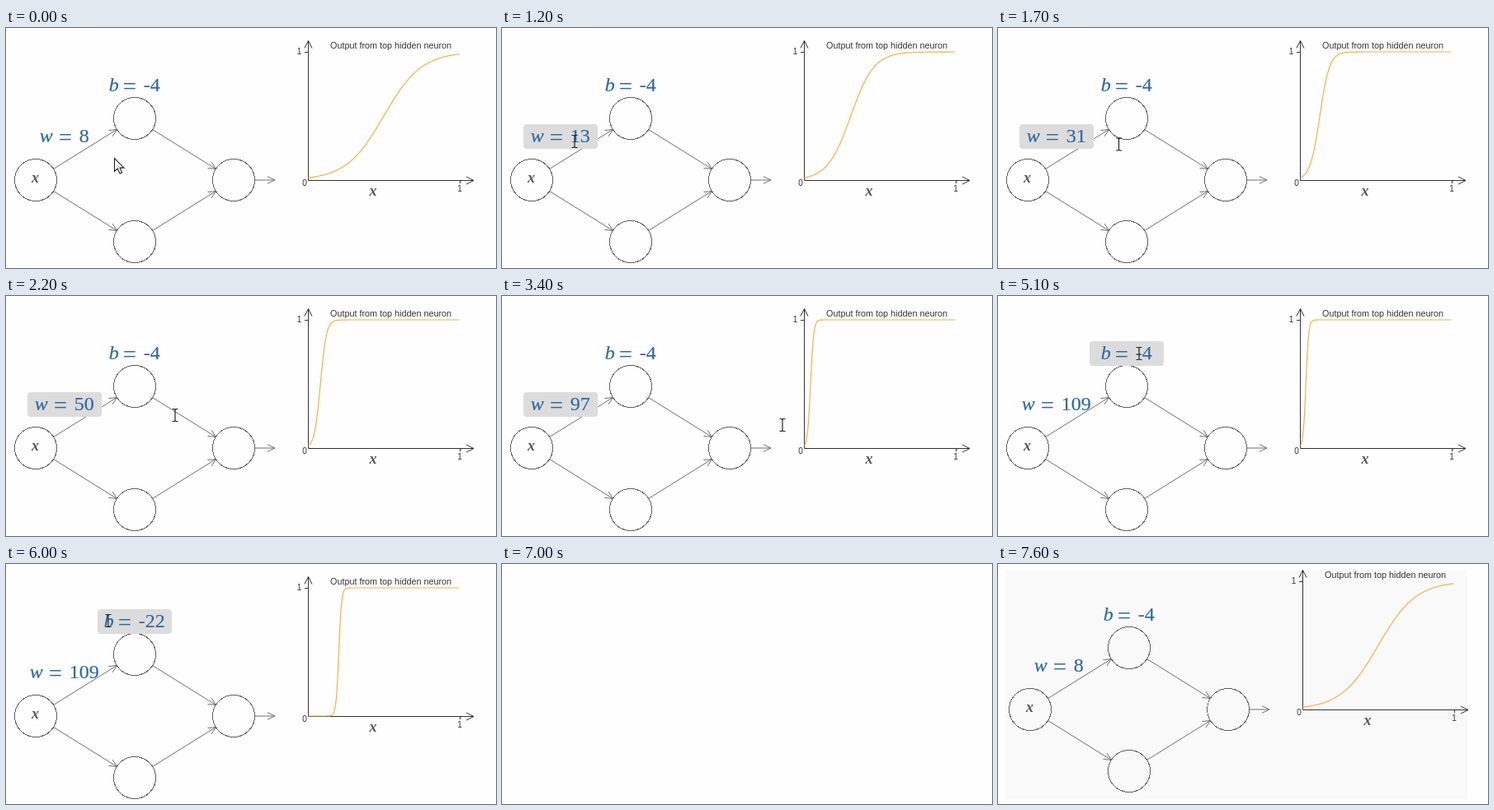
Recreate the animation shown at these times as an HTML page. Size 594 px wide and 292 px high, loop 8 s.

```html
<!DOCTYPE html>
<html lang="en">
<head>
<meta charset="utf-8">
<title>Hidden neuron output</title>
<style>
  html, body { margin: 0; width: 100%; height: 100%; overflow: hidden; background: #fefefe; }
  svg { display: block; width: 594px; height: 292px; }
  path { fill: none; }
  .line { stroke: #6e6e6e; }
  .node { fill: none; stroke: #606060; shape-rendering: crispEdges; }
  .axis { stroke: #333; }
  .curve { stroke: #f3b14c; stroke-width: 1.2; stroke-linejoin: round; }
  .small { font: 10.8px "Liberation Sans", Arial, sans-serif; fill: #333; }
  .tick { font-size: 10px; text-anchor: middle; }
  .var { font: italic bold 18px "Liberation Serif", Times, serif; fill: #555; text-anchor: middle; }
  .label { font: 24px "Liberation Serif", Times, serif; fill: #2f6a9e; stroke: #2f6a9e; stroke-width: .2; }
  .label .name { font-style: italic; }
  .label .eq { font-size: 29px; stroke: none; }
</style>
</head>
<body>
<svg viewBox="0 0 594 292" xmlns="http://www.w3.org/2000/svg">
  <rect id="panel" x="9" y="7" width="560" height="279.5" fill="#f9f9f9"/>
  <g id="scene">
    <g id="net"></g>
    <text class="var" x="35.5" y="188">x</text>
    <path class="axis" d="M366.5 185.5V15.5M362 24.5L366.5 15.5L371 24.5M366.5 185.5H567M558 181L567 185.5L558 190M362 29.5H366.5M550.5 185.5V189"/>
    <text class="small" x="393" y="25">Output from top hidden neuron</text>
    <text class="small tick" x="355.5" y="32">1</text>
    <text class="small tick" x="362" y="192">0</text>
    <text class="small tick" x="550" y="199">1</text>
    <text class="var" x="445" y="204">x</text>
    <path id="curve" class="curve"/>
    <rect id="hoverW" x="26" y="117" width="90" height="30" rx="4"/>
    <rect id="hoverB" x="111" y="55" width="90" height="30" rx="4"/>
    <g id="weight" class="label"></g>
    <g id="bias" class="label"></g>
  </g>
  <path id="arrow" d="M.5 .5V16.5L4.2 13L7 19L9.6 17.9L6.9 12.1H12Z" style="fill:#fff" stroke="#222" stroke-width="1.1"/>
  <path id="beam" d="M-3.5 -7.5H-1L0 -6.5L1 -7.5H3.5M0 -6.5V6.5M-3.5 7.5H-1L0 6.5L1 7.5H3.5" stroke="#222" stroke-width="1.2"/>
</svg>
<script>
const LOOP = 8000, STEP = 100, RADIUS = 25.5;
const GRAB_W = 70, GRAB_B = 171;
const $ = id => document.getElementById(id);

// Pointer stops: ms, x, y
const stops = [
  [0, 131, 158], [400, GRAB_W, 134], [700, GRAB_W, 134], [1200, 88, 138],
  [2200, 205, 145], [3400, 340, 157], [3700, 373, 158], [4200, 298, 122],
  [4800, GRAB_B, 70], [5300, GRAB_B, 70], [6000, 124, 69], [6400, 94, 69]
];

function pointerAt(t) {
  const i = stops.findIndex(s => s[0] > t);
  if (i < 0) return stops[stops.length - 1].slice(1);
  const [t0, x0, y0] = stops[i - 1], [t1, x1, y1] = stops[i];
  const k = (t - t0) / (t1 - t0);
  return [x0 + (x1 - x0) * k, y0 + (y1 - y0) * k];
}

// Both values follow the horizontal drag distance
const dragWeight = x => Math.round(8 + .2073 * Math.max(0, x - GRAB_W) ** 1.083);
const dragBias = x => Math.round(-4 - .385 * (GRAB_B - x));

function values(t) {
  if (t >= 7600) return [8, -4];
  const wx = t < 700 ? GRAB_W : pointerAt(Math.min(t, 3700))[0];
  const bx = pointerAt(Math.max(t, 5300))[0];
  return [dragWeight(wx), dragBias(bx)];
}

function link(a, b, gap = RADIUS) {
  const dir = Math.atan2(b.y - a.y, b.x - a.x);
  const point = (p, r, angle) => `${p.x + r * Math.cos(angle)} ${p.y + r * Math.sin(angle)}`;
  const tip = { x: b.x - gap * Math.cos(dir), y: b.y - gap * Math.sin(dir) };
  const wing = s => point(tip, -10, dir + s);
  return `<path class="line" d="M${point(a, RADIUS, dir)}L${tip.x} ${tip.y}M${wing(.45)}L${tip.x} ${tip.y}L${wing(-.45)}"/>`;
}

const node = (dx, dy) => ({ x: 156 + dx, y: 185 + dy });
const input = node(-120, 0), output = node(120, 0);
const hidden = [node(0, -75), node(0, 75)];
$('net').innerHTML =
  hidden.map(h => link(input, h) + link(h, output)).join('') +
  link(output, node(170, 0), 0) +
  [input, ...hidden, output].map(n => `<circle class="node" cx="${n.x}" cy="${n.y}" r="${RADIUS}"/>`).join('');

function setLabel(el, name, nameWidth, value, center, y) {
  const digits = String(Math.abs(value)).length;
  const width = nameWidth + 32 + digits * 12 + (value < 0 ? 8 : 0);
  const x = center - width / 2;
  el.innerHTML = `<text class="name" x="${x}" y="${y}">${name}</text>` +
    `<text class="eq" x="${x + nameWidth + 6.5}" y="${y + 3.5}">=</text>` +
    `<text x="${x + nameWidth + 31.5}" y="${y}">${value}</text>`;
}

function curvePath(w, b) {
  let d = '';
  for (let px = 0; px <= 183; px += .5) {
    const out = 1 / (1 + Math.exp(-(w * px / 183 + b)));
    d += `${px ? 'L' : 'M'}${366.5 + px} ${(185 - 156 * out).toFixed(2)}`;
  }
  return d;
}

const show = (el, on) => el.setAttribute('visibility', on ? 'visible' : 'hidden');

function setHover(el, t, from, press, to) {
  show(el, t >= from && t < to);
  el.setAttribute('fill', t < press ? '#e6e6e6' : '#dcdcdc');
}

function draw(t) {
  const restart = t >= 7600, blank = t >= 7000 && !restart;
  const [w, b] = values(t);
  const beam = (t >= 400 && t < 3800) || (t >= 4800 && t < 7000);

  show($('panel'), restart);
  $('scene').style.display = blank ? 'none' : '';
  $('scene').setAttribute('transform', restart ? 'translate(3 -8)' : '');
  setHover($('hoverW'), t, 300, 800, 3800);
  setHover($('hoverB'), t, 4700, 5100, 7000);
  setLabel($('weight'), 'w', 16.5, w, 71, 139);
  setLabel($('bias'), 'b', 10.5, b, 156, 77);
  $('curve').setAttribute('d', curvePath(w, b));

  show($('arrow'), !beam && t < 7000);
  show($('beam'), beam);
  for (const id of ['arrow', 'beam']) $(id).setAttribute('transform', `translate(${pointerAt(t)})`);
}

const start = performance.now();
let last = -1;
function tick() {
  const t = Math.floor((performance.now() - start) % LOOP / STEP) * STEP;
  if (t !== last) draw(last = t);
  requestAnimationFrame(tick);
}
tick();
</script>
</body>
</html>
```
